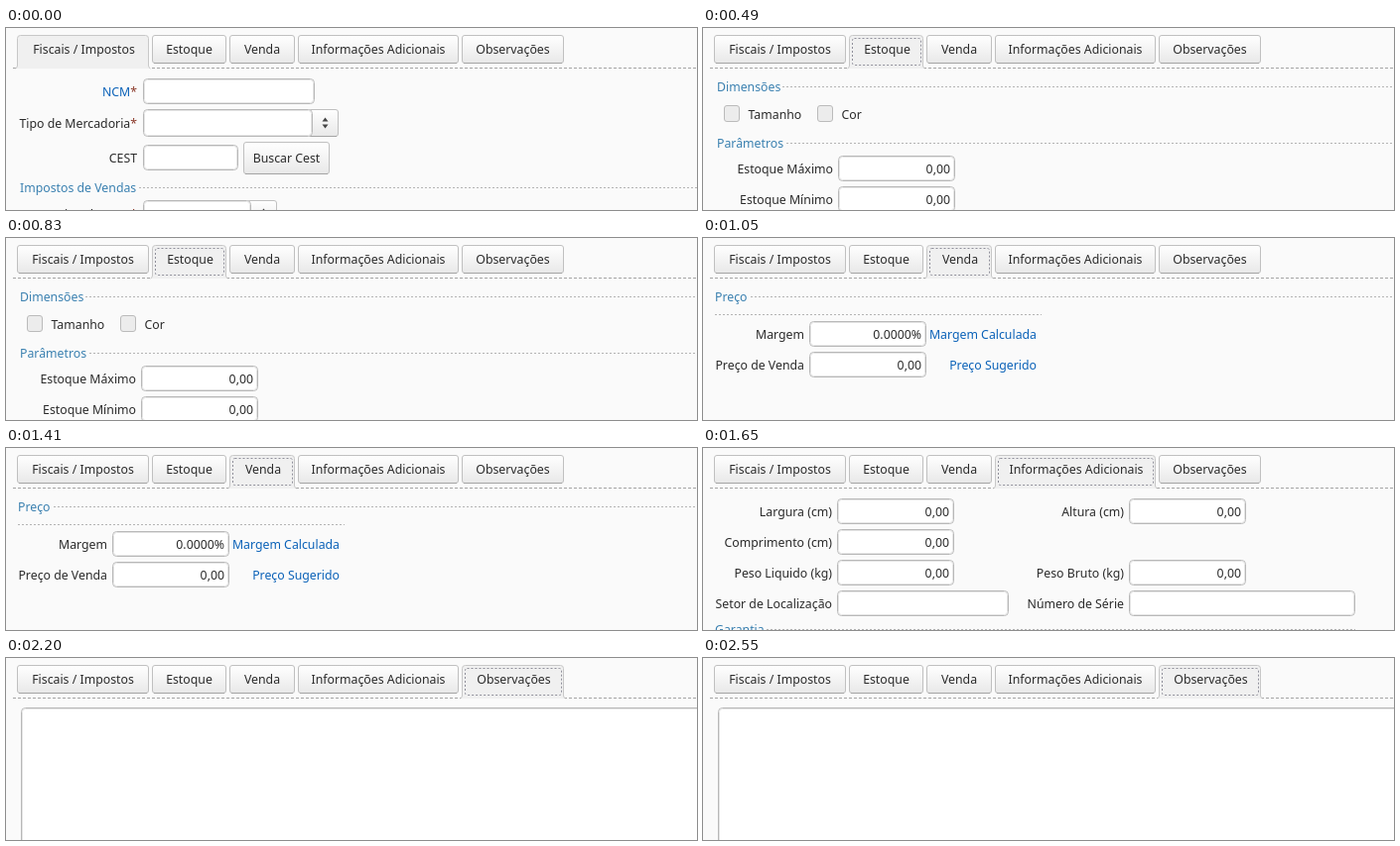
An HTML page for the animation above (2790 ms loop, 696 by 184 pixels).

```html
<!DOCTYPE html>
<html lang="pt-BR">
<head>
<meta charset="utf-8">
<title>Cadastro de produto</title>
<style>
html, body { margin: 0; width: 100%; height: 100%; overflow: hidden; background: #fafafa; }
#strip { display: block; width: 696px; height: 920px; animation: tabs 2790ms step-end infinite; }
@keyframes tabs {
  0% { transform: translateY(0); }
  17.563% { transform: translateY(-184px); }
  37.634% { transform: translateY(-368px); }
  59.14% { transform: translateY(-552px); }
  78.853%, 100% { transform: translateY(-736px); }
}
text { font: 12.3px "Noto Sans", "Open Sans", sans-serif; fill: #2b2b2b; }
.end { text-anchor: end; }
.mid { text-anchor: middle; }
.link { fill: #0b62b8; }
.head { fill: #3a80b0; }
.req { fill: #8b3a2a; }
.field { fill: #fff; stroke: #b8b8b8; }
.inner { fill: none; stroke: #e4e4e4; }
.btn { fill: url(#face); stroke: #c0c0c0; }
.check { fill: #ececec; stroke: #bbb; }
.edge { stroke: #a4a4a4; }
.on { fill: #f0f0f0; stroke: #c8c8c8; }
.focus { fill: none; stroke: #8f8f9a; stroke-dasharray: 2 2; }
.rule { stroke: #a4a4a4; stroke-dasharray: 3 2; }
.dots { stroke: #b4b4b4; stroke-dasharray: 2 2; }
</style>
</head>
<body>
<svg id="strip" viewBox="0 0 696 920"></svg>
<script>
const TABS = [
  ["Fiscais / Impostos", 11, 144], ["Estoque", 147, 222], ["Venda", 225, 291],
  ["Informações Adicionais", 294, 456], ["Observações", 459, 562]
];

const text = (s, x, y, cls = "") => `<text x="${x}" y="${y}" class="${cls}">${s}</text>`;
const label = (s, x, y, cls = "") => text(s, x, y, "end " + cls);
const line = (x1, x2, y, cls) => `<path d="M${x1} ${y + .5}H${x2}" class="${cls}"/>`;
const box = (x1, y1, x2, y2, cls, r = 3) =>
  `<rect x="${x1 + .5}" y="${y1 + .5}" width="${x2 - x1 - 1}" height="${y2 - y1 - 1}" rx="${r}" class="${cls}"/>`;
const button = (x1, y1, x2, y2) =>
  box(x1, y1, x2, y2, "btn", 2.5) + line(x1 + 2, x2 - 2, y2 - 1, "edge");
const field = (x1, y, x2, value = "", h = 26) =>
  box(x1, y, x2, y + h, "field", 4) + box(x1 + 1, y + 1, x2 - 1, y + h - 1, "inner", 3) +
  label(value, x2 - 5, y + 18);
const check = (s, x, y) => box(x, y, x + 16, y + 17, "check", 2.5) + text(s, x + 24.5, y + 14);
const section = (s, x, y, from, to = 696) =>
  text(s, x, y, "head") + line(from, to, y - 5, "dots");
const req = '<tspan class="req">*</tspan>';

function select(x1, y, x2) {
  const c = x2 + 13;
  return button(x2 - 4, y, x2 + 27, y + 28) + field(x1, y, x2 + 1, "", 28) +
    `<path d="M${c - 2.5} ${y + 12.5}l3 -4 3 4zm0 3h6l-3 4z" fill="#444"/>`;
}

function tabBar(active) {
  return line(7, 696, 40, "rule") + TABS.map(([name, a, b], i) => {
    const on = i === active, c = (a + b) / 2 + (on ? 1 : 0);
    const shape = !on ? button(a, 7, b, 36) :
      `<path d="M${a - 1.5} 41q2 -1 2 -3V10.5q0 -3 3 -3H${b - 3.5}q3 0 3 3V38q0 2 2 3" class="on"/>` +
      (i ? box(a + 3, 10, b - 2, 38, "focus", 2) : "");
    return shape + text(name, c, 26, "mid");
  }).join("");
}

// label, label right edge, field right edge, top, value
const row = (s, x, x2, y, value) => label(s, x, y + 18) + field(x + 5, y, x2, value);

const pages = [
  label("NCM" + req, 132, 69, "link") + field(138, 51, 311) +
  label("Tipo de Mercadoria" + req, 132, 101) + select(138, 82, 308) +
  label("CEST", 132, 136) + field(138, 118, 234) +
  button(239, 115, 326, 148) + text("Buscar Cest", 282.5, 136, "mid") +
  section("Impostos de Vendas", 14, 166, 134) +
  label("Tipo de Item" + req, 132, 193) + select(138, 174, 246),

  section("Dimensões", 14, 64, 80) +
  check("Tamanho", 21, 78) + check("Cor", 115, 78) +
  section("Parâmetros", 14, 121, 84) +
  row("Estoque Máximo", 131, 254, 129, "0,00") +
  row("Estoque Mínimo", 131, 254, 160, "0,00"),

  section("Preço", 12, 64, 48) + line(12, 341, 77, "dots") +
  row("Margem", 102, 225, 84, "0.0000%") + label("Margem Calculada", 336, 102, "link") +
  row("Preço de Venda", 102, 225, 115, "0,00") + label("Preço Sugerido", 336, 133, "link"),

  row("Largura (cm)", 130, 253, 51, "0,00") + row("Altura (cm)", 424, 547, 51, "0,00") +
  row("Comprimento (cm)", 130, 253, 82, "0,00") +
  row("Peso Liquido (kg)", 130, 253, 113, "0,00") + row("Peso Bruto (kg)", 424, 547, 113, "0,00") +
  row("Setor de Localização", 130, 308, 144) + row("Número de Série", 424, 657, 144) +
  section("Garantia", 12, 188, 64, 657),

  field(15, 50, 704, "", 150)
];

document.getElementById("strip").innerHTML =
  `<defs><linearGradient id="face" x2="0" y2="1"><stop stop-color="#fff"/>
  <stop offset="1" stop-color="#e8e8e8"/></linearGradient></defs>` +
  pages.map((page, i) =>
    `<svg y="${i * 184}" width="696" height="184"><rect width="696" height="184" fill="#fafafa"/>${tabBar(i)}${page}</svg>`
  ).join("");
</script>
</body>
</html>
```
